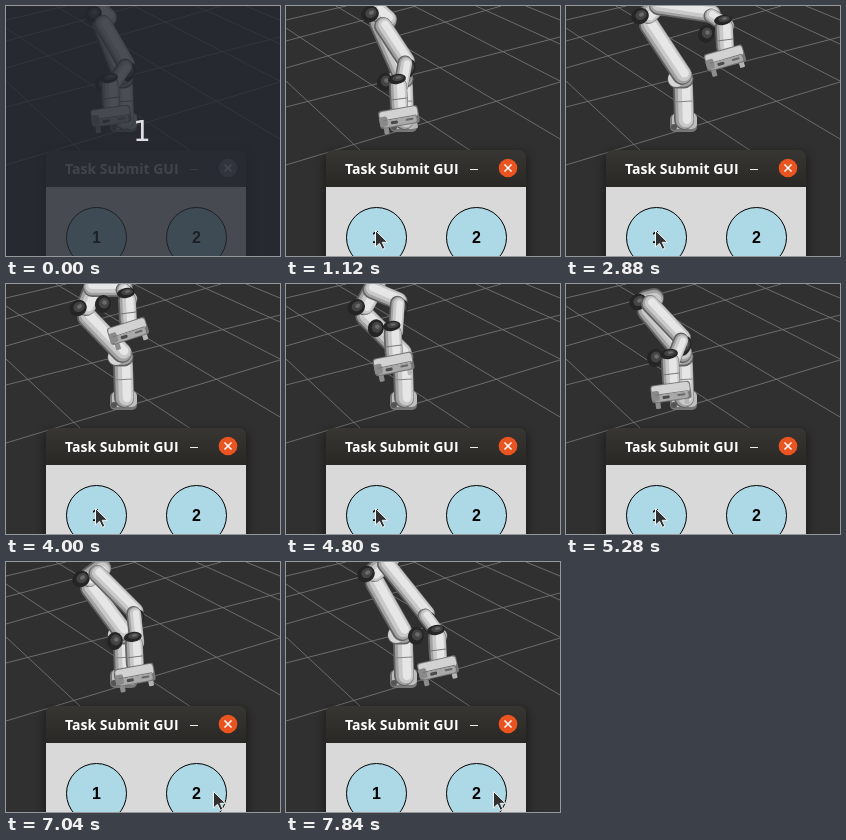
Write an HTML page with a canvas that moves like this. It is 274x250 px and loops after 8 s.

```html
<!DOCTYPE html>
<html lang="en">
<head>
<meta charset="utf-8">
<title>Task Submit GUI</title>
<style>
  html, body { margin: 0; width: 100%; height: 100%; overflow: hidden; background: #303030; }
  #stage { position: relative; width: 274px; height: 250px; overflow: hidden; }
  canvas, svg { position: absolute; left: 0; top: 0; display: block; }
  .grid { stroke: #777; stroke-width: .85; fill: none; }
  .title { font: bold 14px "Open Sans", "Noto Sans", sans-serif; fill: #fff; }
  .digit { font: bold 16px "Liberation Sans", Arial, sans-serif; text-anchor: middle; }
  .count { font: 28px "DejaVu Sans", sans-serif; text-anchor: middle; fill: #dedee0; }
  .min { stroke: #eee; }
  .close { fill: #e95420; }
  .cross { stroke: #fff; stroke-width: 1.5; }
  .idle .title { fill: #b9b6b0; }
  .idle .min { stroke: #8a8884; }
  .idle .close { fill: #6b6670; }
  .idle .cross { stroke: #c4c2c2; }
  .idle .bar { fill: #3a3935; }
  .off { display: none; }
</style>
</head>
<body>
<div id="stage">
  <svg width="274" height="250">
    <rect width="274" height="250" fill="#303030"/>
    <path class="grid" d="M0 159L274 76M0 101L274 31M0 62L215 0M0 35L130 0M0 14L60 0
      M0 75L75 145M0 22L185 145M50 0L274 133M128 0L274 75M190 0L274 38M240 0L274 14"/>
  </svg>
  <canvas id="arm" width="274" height="250"></canvas>
  <svg width="274" height="250">
    <defs>
      <linearGradient id="bar" x2="0" y2="1">
        <stop offset="0" stop-color="#373632"/><stop offset="1" stop-color="#292824"/>
      </linearGradient>
      <filter id="soft" x="-20%" y="-20%" width="140%" height="140%"><feGaussianBlur stdDeviation="5"/></filter>
    </defs>
    <rect x="38" y="146" width="204" height="120" rx="8" opacity=".4" filter="url(#soft)"/>
    <g id="win">
      <path class="bar" fill="url(#bar)" d="M40 181V152Q40 144 48 144H232Q240 144 240 152V181Z"/>
      <text class="title" x="59" y="168">Task Submit GUI</text>
      <path class="min" d="M184 163.5H192"/>
      <circle class="close" cx="222" cy="162" r="9.3"/>
      <path class="cross" d="M218.5 158.5L225.5 165.5M225.5 158.5L218.5 165.5"/>
    </g>
    <rect x="40" y="181" width="200" height="69" fill="#d9d9d9"/>
    <g fill="#add8e6" stroke="#000">
      <circle cx="90.5" cy="231.5" r="30"/>
      <circle cx="190.5" cy="231.5" r="30"/>
    </g>
    <text class="digit" x="90.5" y="237">1</text>
    <text class="digit" x="190.5" y="237">2</text>
    <path id="cursor" d="M0 0V16.5L4 12.8L6.8 18.8L9.4 17.6L6.7 11.8H12Z" fill="#303030" stroke="#f4f4f4"/>
    <g id="intro">
      <rect width="274" height="250" fill="#242830" opacity=".8"/>
      <text class="count" x="136" y="135">1</text>
    </g>
  </svg>
</div>
<script>
const LOOP = 8000, STEP = 160;
const $ = id => document.getElementById(id);
const ctx = $('arm').getContext('2d');
const mix = (a, b, k) => a.map((v, i) => v + (b[i] - v) * k);

// elbow cap, forearm start, forearm end, side joint, hand, hand angle
const pose = {
  home:  [87, 8, 97, 18, 120, 58, 97, 78, 105, 110, -8],
  lean:  [84, 8, 97, 20, 120, 55, 99, 76, 113, 111, -10],
  place: [86, 12, 105, 2, 144, 52, 138, 72, 156, 104, -14],
  reach: [85, 13, 104, 4, 148, 50, 141, 69, 160, 99, -14],
  high:  [74, 10, 92, 0, 146, 8, 140, 28, 159, 52, -16],
  fold:  [72, 24, 86, 4, 118, 4, 97, 20, 122, 47, -18],
  tuck:  [70, 24, 86, 4, 112, 12, 90, 40, 108, 76, -12],
  low:   [72, 18, 84, 20, 116, 54, 89, 74, 105, 108, -8],
  grip:  [70, 18, 82, 18, 118, 58, 92, 84, 108, 121, -8],
  lift:  [72, 20, 86, 18, 122, 48, 96, 82, 115, 117, -9],
  swing: [80, 12, 100, 2, 140, 52, 130, 74, 152, 106, -13]
};
pose.top = mix(pose.high, pose.reach, -.04);
pose.dip = mix(pose.tuck, pose.low, .25);
pose.half = mix(pose.lift, pose.swing, .5);

const keys = [
  [0, 'home'], [800, 'home'], [1120, 'lean'], [1760, 'place'], [2080, 'place'],
  [2240, 'reach'], [2880, 'high'], [3040, 'high'], [3200, 'top'], [3520, 'top'],
  [4000, 'fold'], [4320, 'tuck'], [4640, 'tuck'], [4960, 'dip'], [5120, 'dip'],
  [5280, 'low'], [5600, 'grip'], [6400, 'grip'], [6560, 'lift'], [7200, 'half'],
  [7520, 'half'], [7840, 'swing'], [8000, 'swing']
];

function poseAt(t) {
  const i = keys.findIndex(k => k[0] > t);
  const [t0, a] = keys[i - 1], [t1, b] = keys[i];
  return mix(pose[a], pose[b], (t - t0) / (t1 - t0));
}

function line(x0, y0, x1, y1, w, color) {
  ctx.lineWidth = w;
  ctx.strokeStyle = color;
  ctx.beginPath();
  ctx.moveTo(x0, y0);
  ctx.lineTo(x1, y1);
  ctx.stroke();
}

function limb(x0, y0, x1, y1, w) {
  const len = Math.hypot(x1 - x0, y1 - y0) || 1;
  let nx = (y1 - y0) / len, ny = (x0 - x1) / len;
  if (nx < 0) { nx = -nx; ny = -ny; }
  [[0, w, '#626262'], [.04, w - 2, '#a2a2a2'], [.1, w * .72, '#c9c9c9'], [.15, w * .42, '#e6e6e6']]
    .forEach(([k, lw, c]) => {
      const dx = nx * w * k, dy = ny * w * k;
      line(x0 + dx, y0 + dy, x1 + dx, y1 + dy, lw, c);
    });
}

function oval(x, y, rx, ry, color, turn = 0) {
  ctx.fillStyle = color;
  ctx.beginPath();
  ctx.ellipse(x, y, rx, ry, turn, 0, 7);
  ctx.fill();
}

function cap(x, y, rx, ry, turn) {
  oval(x, y, rx, ry, '#252525', turn);
  oval(x + 1, y - 1, rx * .65, ry * .6, '#444', turn);
  oval(x + 1.5, y - 1.5, rx * .3, ry * .25, '#6a6a6a', turn);
}

function box(x, y, w, h, color, r = 1) {
  ctx.fillStyle = color;
  ctx.beginPath();
  ctx.roundRect(x, y, w, h, r);
  ctx.fill();
}

function base() {
  box(104, 108, 27, 18, '#777', 5);
  box(106, 107, 25, 16, '#bdbdbd', 5);
  limb(118, 114, 117, 80, 20);
  line(109, 96, 126, 95, 1, '#858585');
  oval(108, 121, 3, 3, '#555');
  limb(111, 73, 118, 73, 19);
  oval(110, 73, 8, 8, '#d5d5d5');
}

function hand(x, y, deg) {
  ctx.save();
  ctx.translate(x, y);
  ctx.rotate(deg * Math.PI / 180);
  box(-17, 7, 5, 8, '#8d8d8d');
  box(12, 7, 5, 7, '#b5b5b5');
  box(-20, -9, 40, 18, '#777', 3);
  box(-19, -8, 38, 10, '#d2d2d2', 3);
  box(-17, 2, 34, 6, '#a9a9a9', 2);
  box(-20, -3, 8, 10, '#8a8a8a', 2);
  box(-9, 3, 7, 3, '#4a4a4a');
  box(6, 3, 8, 2, '#686868');
  line(-16, 1, 17, 1, 1, '#777');
  ctx.restore();
}

function drawArm([dx, dy, fx, fy, wx, wy, kx, ky, hx, hy, deg]) {
  ctx.clearRect(0, 0, 274, 250);
  ctx.lineCap = 'round';
  base();
  limb(116, 69, dx + 9, dy + 9, 20);
  limb(dx + 8, dy - 2, fx + 4, fy - 6, 20);
  cap(dx, dy, 9, 8, -.5);
  limb(fx, fy, wx, wy, 18);
  cap(wx + 3, wy + 8, 6, 10, .3);
  limb(wx - 1, wy + 2, hx + 2, hy - 32, 15);
  cap(kx, ky, 8, 9, .2);
  limb(hx - 1, hy - 31, hx, hy - 11, 18);
  cap(hx - 2, hy - 38, 9, 5, -.15);
  line(hx - 8, hy - 17, hx + 8, hy - 19, 1, '#777');
  hand(hx, hy, deg);
}

const start = performance.now();
function frame() {
  const now = (performance.now() - start) % LOOP;
  const t = Math.floor(now / STEP) * STEP;
  drawArm(poseAt(t));
  $('intro').classList.toggle('off', t >= 160);
  $('win').classList.toggle('idle', t < 640);
  $('cursor').classList.toggle('off', t < 640);
  $('cursor').setAttribute('transform', t < 5920 ? 'translate(89.5 224.5)' : 'translate(207.5 229.5)');
  requestAnimationFrame(frame);
}
frame();
</script>
</body>
</html>
```
